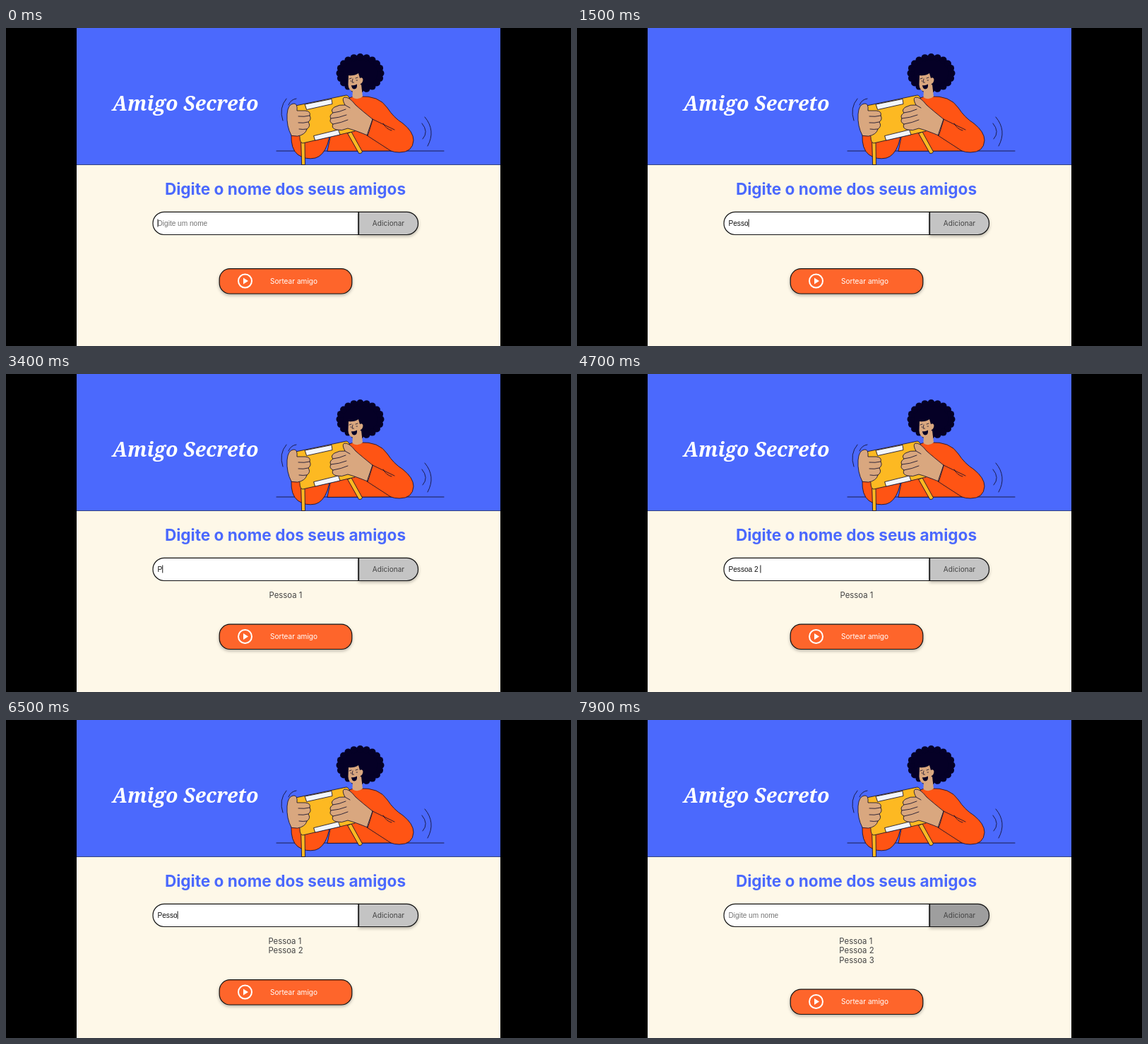
An HTML page for the animation above (8 s loop, 800 px wide and 450 px high).

```html
<!DOCTYPE html>
<html lang="pt-BR">
<head>
<meta charset="utf-8">
<title>Amigo Secreto</title>
<style>
  html, body { margin: 0; width: 100%; height: 100%; overflow: hidden; background: #000; }
  svg { display: block; width: 800px; height: 450px; }
  text { font-family: Inter, sans-serif; font-size: 10.1px; white-space: pre; }
  .title { font: italic 700 28.45px "Noto Serif", serif; fill: #fff; }
  .heading { font-size: 22.6px; font-weight: 700; fill: #4b69fd; }
  .list text { font-size: 11.36px; fill: #444; }
  .mid { text-anchor: middle; }
  #entry { font-family: "Liberation Sans", Arial, sans-serif; }
  .box { stroke: #111; stroke-width: 1.2; }
  .raised { filter: drop-shadow(0 2px 2px rgba(0, 0, 0, .28)); }
  .art { stroke: #14102c; stroke-width: .85; stroke-linejoin: round; stroke-linecap: round; }
  .line { fill: none; }
  .orange { fill: #ff5414; }
  .skin { fill: #d9a77f; }
  .gold { fill: #fdb922; }
  .patch { fill: #f3f6fa; }
  .dark { fill: #050026; stroke: none; }
</style>
</head>
<body>
<svg viewBox="0 0 800 450">
  <rect x="100" width="600" height="450" fill="#fef8e8"/>
  <rect x="100" width="600" height="194" fill="#4b69fd"/>
  <path d="M100 193.500H700" stroke="#34447f"/>

  <text class="title" x="150.500" y="117.300">Amigo Secreto</text>

  <g class="art">
    <path class="line" d="M383 174H620"/>
    <path class="line" d="M397 100Q386 113 392 131M411 100Q403 101 400 109"/>
    <path class="line" d="M593 126Q609 145 597 167M589 135Q599 147 590 157"/>
    <!-- torso and right arm -->
    <path class="orange" d="M455 174L459 155L480 102Q489 96 500 97Q528 95 540 113Q549 127 562 135Q577 147 577 159Q576 176 557 176Q550 176 545 174Z"/>
    <path class="orange" d="M404 151Q403 171 413 179Q424 187 438 184Q449 181 455 165L458 154Z"/>
    <!-- head -->
    <g id="hair" class="dark"></g>
    <path class="skin" d="M491 85L490.500 98Q498 103 505 97L503 80Z" stroke="none"/>
    <path class="skin" d="M485 67Q493 68 499 64L501 71Q505 69 505.500 73Q505 78 502 79Q501 90 492 90Q485 89 484.500 80Z" stroke="none"/>
    <path class="line" d="M486 72L489 71M495 71L498 70M491 72L490 77L492.500 77M488 75H489M496 74H497.500" stroke-width=".8"/>
    <path class="dark" d="M489 81Q493 82 497 79.500Q497.500 86.500 493 86.500Q489.500 86 489 81Z"/>
    <!-- drum -->
    <path class="gold" d="M418 160H423L423.500 193.500H419ZM484 149L489 147L504.500 175Q504 178 500 177.500Z"/>
    <path class="gold" d="M410 110L482 95Q486 96 487 102L494 146L420 163Q416 162 416 155Z"/>
    <path class="patch" d="M423.500 108L461 100.500L462 107.500L426 115.500ZM436 152.500L470.500 144L473 151L438 159Z"/>
    <!-- left hand -->
    <path class="skin" d="M404 152Q397 139 398 122Q399 108 407 107Q413 106 412 117L424 117Q432 118 430 124Q433 129 428 133Q432 139 426 143Q424 151 413 153Z"/>
    <path class="line" d="M430 124Q422 126 414 125M428 133Q421 135 414 134M426 143Q420 144 415 143"/>
    <!-- right hand -->
    <path class="skin" d="M519 129Q504 117 495 109Q486 97 479 98Q475 100 480 109Q472 108 465 112Q459 116 463 120Q457 124 460 128Q457 133 463 136Q460 142 468 144Q475 146 484 142Q495 145 512 152Z"/>
    <path class="line" d="M463 120Q472 119 481 115M460 128Q472 127 482 123M463 136Q475 134 484 130M480 109L487 113"/>
    <path class="line" d="M519 129L511 152L545 174M519 129L550 144M534 135Q538 143 546 145"/>
  </g>

  <text class="heading mid" x="395.500" y="235.500">Digite o nome dos seus amigos</text>

  <path class="box" d="M499 260.300H224A16 16.100 0 0 0 224 292.500H499Z" fill="#fff"/>
  <g class="raised">
    <path id="add" class="box" d="M499.500 260.300H567.500A16 16.100 0 0 1 567.500 292.500H499.500Z"/>
  </g>
  <text class="mid" x="541.500" y="279.900" fill="#444">Adicionar</text>
  <text id="entry" x="214.500" y="279.700"></text>
  <path id="caret" d="M0 270.500V281.500" stroke="#000" stroke-width=".9"/>

  <g class="list" id="list"></g>

  <g id="draw">
    <g class="raised"><rect class="box" x="302.200" y="340.700" width="187.600" height="35.300" rx="15" fill="#fe652b"/></g>
    <circle cx="338.500" cy="358" r="9.500" fill="none" stroke="#fff" stroke-width="2"/>
    <path d="M336 353.500L343 358L336 362.500Z" fill="#fff"/>
    <text class="mid" x="407.500" y="361.700" fill="#fff">Sortear amigo</text>
  </g>
</svg>
<script>
const LOOP = 8000, ROW = 13.5;
const $ = id => document.getElementById(id);
const svg = (tag, attrs, parent) => {
  const node = document.createElementNS("http://www.w3.org/2000/svg", tag);
  for (const key in attrs) node.setAttribute(key, attrs[key]);
  return parent.appendChild(node);
};
const show = (node, on) => node.setAttribute("visibility", on ? "visible" : "hidden");

// Each round: first key, time per key, pointer over the button, click, pointer leaves, field focused
const rounds = [
  { type: 1050, key: 100, hover: 2150, click: 2450, leave: 2750, focus: 2900 },
  { type: 3350, key: 150, hover: 4850, click: 5050, leave: 5250, focus: 5350 },
  { type: 6050, key: 100, hover: 7250, click: 7550, leave: LOOP, focus: LOOP }
];

svg("ellipse", { cx: 501.5, cy: 64, rx: 31, ry: 25 }, $("hair"));
for (let i = 0; i < 20; i++) {
  const a = i * Math.PI / 10;
  svg("circle", { cx: 501.5 + 29 * Math.cos(a), cy: 64 + 23 * Math.sin(a), r: 5 }, $("hair"));
}
const rows = rounds.map((_, i) => {
  const row = svg("text", { y: 316.6 + i * ROW }, $("list"));
  row.textContent = `Pessoa ${i + 1}`;
  return row;
});

function render(t) {
  let typed = "", lastInput = 0, focused = true, hovered = false, count = 0;
  rounds.forEach((r, i) => {
    if (t >= r.click) {
      count++;
      focused = t >= r.focus;
      lastInput = r.focus;
    } else if (t >= r.type) {
      const word = `Pessoa ${i + 1} `;
      const n = Math.min(word.length, Math.floor((t - r.type) / r.key) + 1);
      typed = word.slice(0, n);
      lastInput = r.type + (n - 1) * r.key;
    }
    hovered ||= t >= r.hover && t < r.leave;
  });

  const entry = $("entry");
  entry.textContent = typed || "Digite um nome";
  entry.setAttribute("fill", typed ? "#111" : "#757575");
  const x = 215 + (typed ? entry.getComputedTextLength() : 0);
  $("caret").setAttribute("transform", `translate(${x})`);
  show($("caret"), focused && (t - lastInput) % 1000 < 500);
  $("add").setAttribute("fill", hovered ? "#9e9e9e" : "#c4c4c4");

  // The list is centred as a block, its rows aligned left
  const widths = rows.slice(0, count).map(row => row.getComputedTextLength());
  const left = 396 - Math.max(0, ...widths) / 2;
  rows.forEach((row, i) => {
    row.setAttribute("x", left);
    show(row, i < count);
  });
  $("draw").setAttribute("transform", `translate(0 ${count * ROW})`);
}

const start = performance.now();
function tick() {
  render((performance.now() - start) % LOOP);
  requestAnimationFrame(tick);
}
tick();
</script>
</body>
</html>
```
